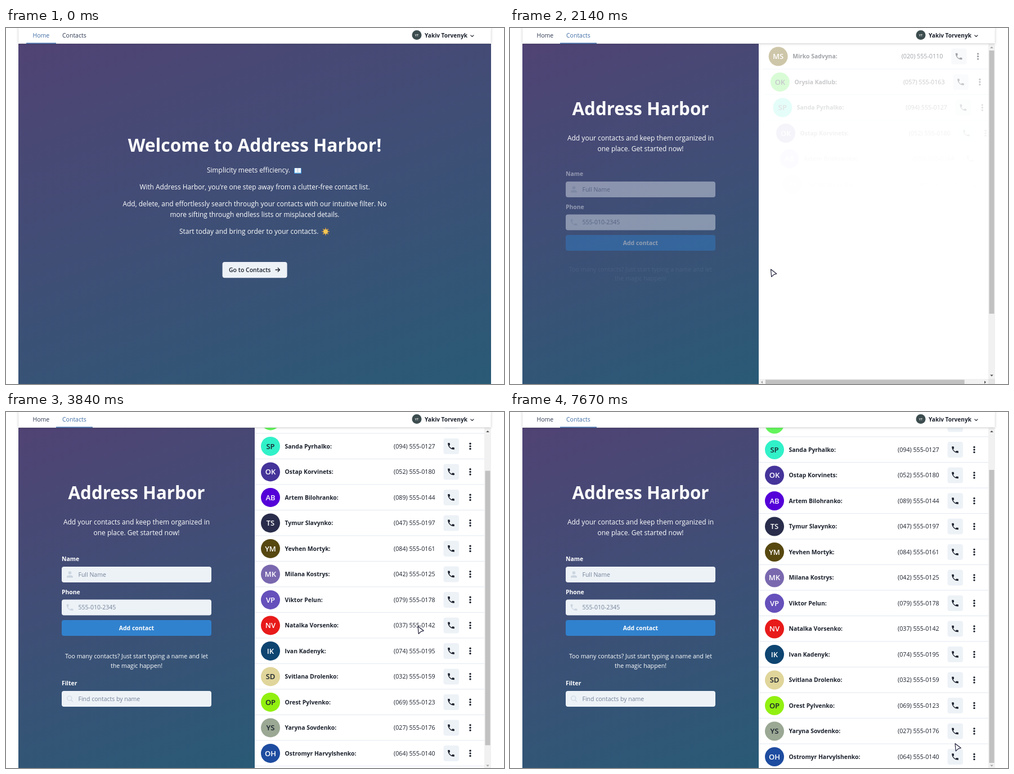
Animation, 885 px wide and 633 px high, one loop 8 s. Source, as an HTML page:

```html
<!DOCTYPE html>
<html lang="en">
<head>
<meta charset="utf-8">
<title>Address book</title>
<style>
  html, body { margin: 0; width: 100%; height: 100%; overflow: hidden; background: #fff; }
  #panel { position: absolute; left: 22px; top: 28px; height: 605px;
    background: linear-gradient(160deg, #504374, #3e4f76 50%, #295a76); }
  svg { position: absolute; left: 0; top: 0; font-family: "Open Sans", "Noto Sans", sans-serif; }
  #nav > rect:first-child { filter: drop-shadow(0 1px 2px rgba(0, 0, 0, .2)); }
  #menu > rect:first-child { filter: drop-shadow(0 1px 2px rgba(0, 0, 0, .12)); }
</style>
</head>
<body>
<div id="panel"></div>
<svg id="stage" width="885" height="633" viewBox="0 0 885 633"></svg>
<script>
const LOOP = 8000, ROW = 45.5;
const INK = '#1a202c', PALE = '#edf2f7', ACTIVE = [63, 108, 164], IDLE = [45, 55, 80];
const PHONE = 'M6.62 10.79c1.44 2.83 3.76 5.14 6.59 6.59l2.2-2.2c.27-.27.67-.36 1.02-.24 1.12.37 2.33.57 3.57.57.55 0 1 .45 1 1V20c0 .55-.45 1-1 1-9.39 0-17-7.61-17-17 0-.55.45-1 1-1h3.5c.55 0 1 .45 1 1 0 1.25.2 2.45.57 3.57.11.35.03.74-.25 1.02l-2.2 2.2z';

const contacts = [
  ['Mirko Sadvyna', '#8a7631'], ['Orysia Kadlub', '#64f55c'], ['Sanda Pyrhalko', '#31f1c9'],
  ['Ostap Korvinets', '#45349a'], ['Artem Bilohranko', '#5400d8'], ['Tymur Slavynko', '#292d4b'],
  ['Yevhen Mortyk', '#574810'], ['Milana Kostrys', '#7a68af'], ['Viktor Pelun', '#6650bb'],
  ['Natalka Vorsenko', '#e81a1a'], ['Ivan Kadenyk', '#0d4470'], ['Svitlana Drolenko', '#e0d59a'],
  ['Orest Pylvenko', '#92f011'], ['Yaryna Sovdenko', '#9aa894'], ['Ostromyr Harvylshenko', '#1e4ca0'],
  ['Kalyna Zhom', '#08cc94'],
];

// Markup helpers
const text = (x, y, size, str, attrs = '') =>
  `<text x="${x}" y="${y}" dy=".36em" font-size="${size}" ${attrs}>${str}</text>`;
const mid = (x, y, size, str, attrs = '') => text(x, y, size, str, 'text-anchor="middle" ' + attrs);
const box = (x, y, w, h, fill, attrs = '') =>
  `<rect x="${x}" y="${y}" width="${w}" height="${h}" fill="${fill}" ${attrs}/>`;
const path = (d, attrs) => `<path d="${d}" ${attrs}/>`;
const phone = (x, y, fill) =>
  path(PHONE, `fill="${fill}" transform="translate(${x} ${y}) scale(.65) translate(-12 -12)"`);
const bold = 'font-weight="700"';
const line = (color, width) =>
  `fill="none" stroke="${color}" stroke-width="${width}" stroke-linecap="round" stroke-linejoin="round"`;
const field = (y, hint, icon) => box(99, y, 266, 28, PALE, 'rx="4"') + icon +
  text(128.5, y + 14, 10.5, hint, 'fill="#718096"');
const step = (...parts) => `<g class="step">${parts.join('')}</g>`;

function isLight(hex) {
  const [r, g, b] = [1, 3, 5].map(i => parseInt(hex.slice(i, i + 2), 16));
  return .3 * r + .59 * g + .11 * b > 130;
}

function contactRow([name, color], i) {
  const initials = name.split(' ').map(word => word[0]).join('');
  const number = `(0${20 + i * 37 % 79}) 555-01${10 + i * 53 % 89}`;
  return `<g class="row"><circle cx="470" r="17" fill="${color}"/>` +
    mid(470, 0, 13, initials, `font-weight="600" fill="${isLight(color) ? INK : '#fff'}"`) +
    text(495.5, 0, 10.4, name + ':', `${bold} fill="${INK}"`) +
    text(689, 0, 10.7, number, `fill="${INK}"`) +
    box(777.5, -14, 27.5, 28, PALE, 'rx="4"') + phone(791, 0, INK) +
    [-4.6, 0, 4.6].map(y => `<circle cx="825" cy="${y}" r="1.7" fill="${INK}"/>`).join('') +
    box(442, 22, 408, 1, '#e2e8f0') + '</g>';
}

const sunRays = Array.from({ length: 8 }, (_, i) =>
  `<path d="M0 -5V-6" transform="translate(568 362) rotate(${i * 45})" ${line('#e8a33d', 1.6)}/>`).join('');

document.getElementById('stage').innerHTML = `
<defs><clipPath id="listClip"><rect x="442" y="28" width="408" height="605"/></clipPath></defs>
<g id="home" fill="#fff">
  ${mid(442, 209, 31.8, 'Welcome to Address Harbor!', bold)}
  ${text(357, 253, 11.9, 'Simplicity meets efficiency.')}
  ${box(512, 249, 13, 10, '#3f9be0', 'rx="1"')}${box(513, 249, 11, 8.5, '#eef4fa')}${box(518, 249, 1, 9, '#b9cde0')}
  ${mid(442, 283, 11.9, "With Address Harbor, you're one step away from a clutter-free contact list.")}
  ${mid(442, 313, 11.95, 'Add, delete, and effortlessly search through your contacts with our intuitive filter. No')}
  ${mid(442, 332, 11.9, 'more sifting through endless lists or misplaced details.')}
  ${text(308, 362, 11.95, 'Start today and bring order to your contacts.')}
  ${sunRays}<circle cx="568" cy="362" r="4.2" fill="#f6c552"/>
  ${box(384.6, 416, 115, 28.3, PALE, 'rx="4" id="goButton"')}
  ${text(396, 430, 10.5, 'Go to Contacts', `font-weight="600" fill="${INK}"`)}
  ${path('M479 430h7.5m-3.3-3.3l3.3 3.3l-3.3 3.3', line(INK, 1.3))}
</g>
<g id="contactsPage" fill="#fff">
  ${step(mid(232, 144, 31.3, 'Address Harbor', bold))}
  ${step(mid(232, 196, 12, 'Add your contacts and keep them organized in'),
         mid(232, 215, 12, 'one place. Get started now!'))}
  ${step(text(99, 261, 10.4, 'Name', bold),
         field(275, 'Full Name', '<g fill="#cbd5e0"><circle cx="113.5" cy="286" r="2.8"/>' +
           path('M108 294.5v-1.2q0-3 5.5-3t5.5 3v1.2z', '') + '</g>'),
         text(99, 320, 10.4, 'Phone', bold),
         field(333.5, '555-010-2345', phone(113.5, 347.5, '#cbd5e0')),
         '<g id="addButton">', box(99, 370, 266, 28, '#3182ce', 'rx="4"'),
         mid(232, 384, 10.4, 'Add contact', bold), '</g>')}
  ${step(mid(232, 434.5, 10.65, 'Too many contacts? Just start typing a name and let'),
         mid(232, 451, 10.65, 'the magic happen!'))}
  ${step(text(99, 482, 10.4, 'Filter', bold),
         field(496, 'Find contacts by name',
           path('M115.8 512.3l2.7 2.7M116.8 509a4 4 0 1 1-8 0a4 4 0 1 1 8 0', line('#cbd5e0', 1.2))))}
</g>
<g id="list">
  <g clip-path="url(#listClip)">${contacts.map(contactRow).join('')}</g>
  ${box(850, 28, 12, 605, '#f1f1f1')}${box(851.5, 40, 9, 468, '#c1c1c1', 'id="vThumb"')}
  ${path('M853.2 36l2.8-3l2.8 3z', 'id="upArrow"')}${path('M853.2 -1.5l2.8 3l2.8-3z', 'id="downArrow"')}
  <g id="hBar">
    ${box(442, 624, 408, 9, '#f1f1f1')}${box(850, 624, 12, 9, '#e4e4e4')}
    ${box(454, 625.5, 354, 7.5, '#c1c1c1', 'id="hThumb"')}
    ${path('M449 627.2l-3 2.6l3 2.6z', 'fill="#a3a3a3"')}${path('M843 627.2l3 2.6l-3 2.6z', 'fill="#505050"')}
  </g>
</g>
<g id="nav">
  ${box(22, -6, 840, 33, '#fff')}${box(22, 4, 1, 23, '#f4f4f6')}${box(861, 4, 1, 23, '#f4f4f6')}
  ${text(47.5, 13, 10.5, 'Home', 'id="homeTab"')}${text(100, 13, 10.5, 'Contacts', 'id="contactsTab"')}
  ${box(36, 26.4, 53, 1.4, '#2f62a4', 'id="underline"')}
  <circle cx="730" cy="12.5" r="8.5" fill="#3d4d4f"/>${mid(730, 12.5, 5.6, 'YT', 'font-weight="600" fill="#fff"')}
  ${text(744, 13, 10.1, 'Yakiv Torvenyk', `${bold} fill="${INK}"`)}
  ${path('M825.8 12.8l2.6 2.6l2.6-2.6', line(INK, 1.2))}
</g>
<g id="menu">
  ${box(812, 508, 90, 80, '#fff', 'rx="4" stroke="#e2e8f0"')}
  ${box(812.5, 559, 90, 23, PALE, 'id="highlight"')}
  ${['Call', 'Edit', 'Delete'].map((s, i) => text(821, 524.5 + 23 * i, 10.5, s, `fill="${INK}"`)).join('')}
</g>
<g id="cursor" fill="#fff" stroke="#20203c" stroke-width="1.2" stroke-linejoin="round">
  ${path('M0 0L10.3 8L5.5 9.4L1.2 13.3Z', 'id="arrow"')}
  ${path('M-1.5 1.5a1.5 1.5 0 0 1 3 0v4.2l5 1.2q1.5.5 1.3 2l-.8 4q-.3 1.8-1.8 1.8h-4q-1 0-1.7-1l-3.5-5q.6-1.8 2.5-.2z', 'id="hand"')}
</g>`;

const $ = id => document.getElementById(id);
const steps = [...document.querySelectorAll('.step')], rows = [...document.querySelectorAll('.row')];
const set = (el, attrs) => { for (const key in attrs) el.setAttribute(key, attrs[key]); };
const show = (el, on) => { el.style.display = on ? '' : 'none'; };

// Timing helpers
const span = (t, from, to) => Math.min(1, Math.max(0, (t - from) / (to - from)));
const mix = (a, b, p) => a + (b - a) * p;
const smooth = p => p * p * (3 - 2 * p);
const between = (t, from, to) => t >= from && t < to;
const tint = (from, to, p) => `rgb(${from.map((c, i) => Math.round(mix(c, to[i], p)))})`;

function bezier(x1, y1, x2, y2) {
  const at = (a, b, s) => 3 * (1 - s) ** 2 * s * a + 3 * (1 - s) * s * s * b + s ** 3;
  return p => {
    let low = 0, high = 1;
    for (let i = 0; i < 20; i++) {
      const s = (low + high) / 2;
      if (at(x1, x2, s) < p) low = s; else high = s;
    }
    return at(y1, y2, (low + high) / 2);
  };
}
const ease = bezier(.25, .1, .25, 1), easeOut = bezier(0, 0, .58, 1);
const fadeIn = age => span(age, 0, 410) ** 3;
const remaining = age => 1 - ease(span(age, 0, 600));

// Pointer stops: time, x, y
const stops = [
  [500, 530, 100], [1040, 463.5, 429], [2980, 463.5, 429], [3240, 732, 381], [4310, 732, 381],
  [4680, 831, 585], [4790, 824.5, 606.5], [4930, 824, 612], [5110, 824, 612], [5130, 824.5, 607],
  [5560, 824.5, 607], [6020, 853, 568], [6290, 853, 568], [6360, 856, 567], [7460, 856, 567], [7670, 791, 589.5],
];
function pointerAt(t) {
  const next = stops.findIndex(stop => stop[0] > t);
  if (next < 1) return stops.at(next).slice(1);
  const [a, b] = [stops[next - 1], stops[next]], p = smooth(span(t, a[0], b[0]));
  return [mix(a[1], b[1], p), mix(a[2], b[2], p)];
}

function render(t) {
  const mounted = t >= 1460, removed = t >= 6840, [px, py] = pointerAt(t);

  $('panel').style.width = mix(840, 420, easeOut(span(t, 1461, 1950))) + 'px';
  set($('home'), { opacity: 1 - span(t, 1240, 1460) });
  set($('goButton'), { fill: between(t, 960, 1460) ? '#e2e8f0' : PALE });

  steps.forEach((el, i) => {
    const age = t - 1550 - 140 * i, drop = i < 4 ? -11 * remaining(age) : 0;
    set(el, { opacity: fadeIn(age), transform: `translate(0 ${drop})` });
  });
  set($('addButton'), { opacity: between(t, 6560, 6840) ? .4 : 1 });

  // Contact list and its scrollbars
  const scroll = removed ? 74.5 : 120 * smooth(span(t, 3730, 3910));
  const slide = i => 35 * remaining(t - 1836 - 50 * i);
  show($('list'), mounted);
  rows.forEach((el, i) => {
    const last = i === rows.length - 1;
    show(el, !(last && removed));
    set(el, {
      opacity: fadeIn(t - 1836 - 50 * i) * (last ? 1 - span(t, 6630, 6840) : 1),
      transform: `translate(${slide(i)} ${50.5 + ROW * i - scroll})`,
    });
  });
  const overflow = slide(rows.length - 1), hBar = overflow > .05;
  show($('hBar'), hBar);
  set($('hThumb'), { width: 384 * 408 / (408 + overflow) });
  set($('vThumb'), { y: 40 + scroll * (removed ? .845 : .8), height: hBar ? 468 : removed ? 521 : 488 });
  set($('upArrow'), { fill: scroll > 0 ? '#505050' : '#a3a3a3' });
  set($('downArrow'), { fill: scroll > 74 ? '#a3a3a3' : '#505050', transform: `translate(0 ${hBar ? 618 : 629})` });

  // Navigation
  const swap = span(t, 1590, 1920), onContacts = t >= 1650;
  set($('homeTab'), { fill: tint(ACTIVE, IDLE, swap) });
  set($('contactsTab'), { fill: tint(IDLE, ACTIVE, swap) });
  set($('underline'), { x: onContacts ? 89 : 36, width: onContacts ? 65 : 53 });

  // Row menu
  const open = ease(span(t, 5270, 5470)) * (1 - span(t, 6560, 6660)), size = .8 + .2 * open;
  set($('menu'), { opacity: open, transform: `translate(812 588) scale(${size}) translate(-812 -588)` });
  show($('highlight'), py < 582);

  const hand = between(t, 960, 1460) || between(t, 4740, 6560);
  show($('cursor'), t >= 500);
  show($('hand'), hand);
  show($('arrow'), !hand);
  set($('cursor'), { transform: `translate(${px} ${py})` });
}

const start = performance.now();
function tick() {
  render((performance.now() - start) % LOOP);
  requestAnimationFrame(tick);
}
tick();
</script>
</body>
</html>
```
